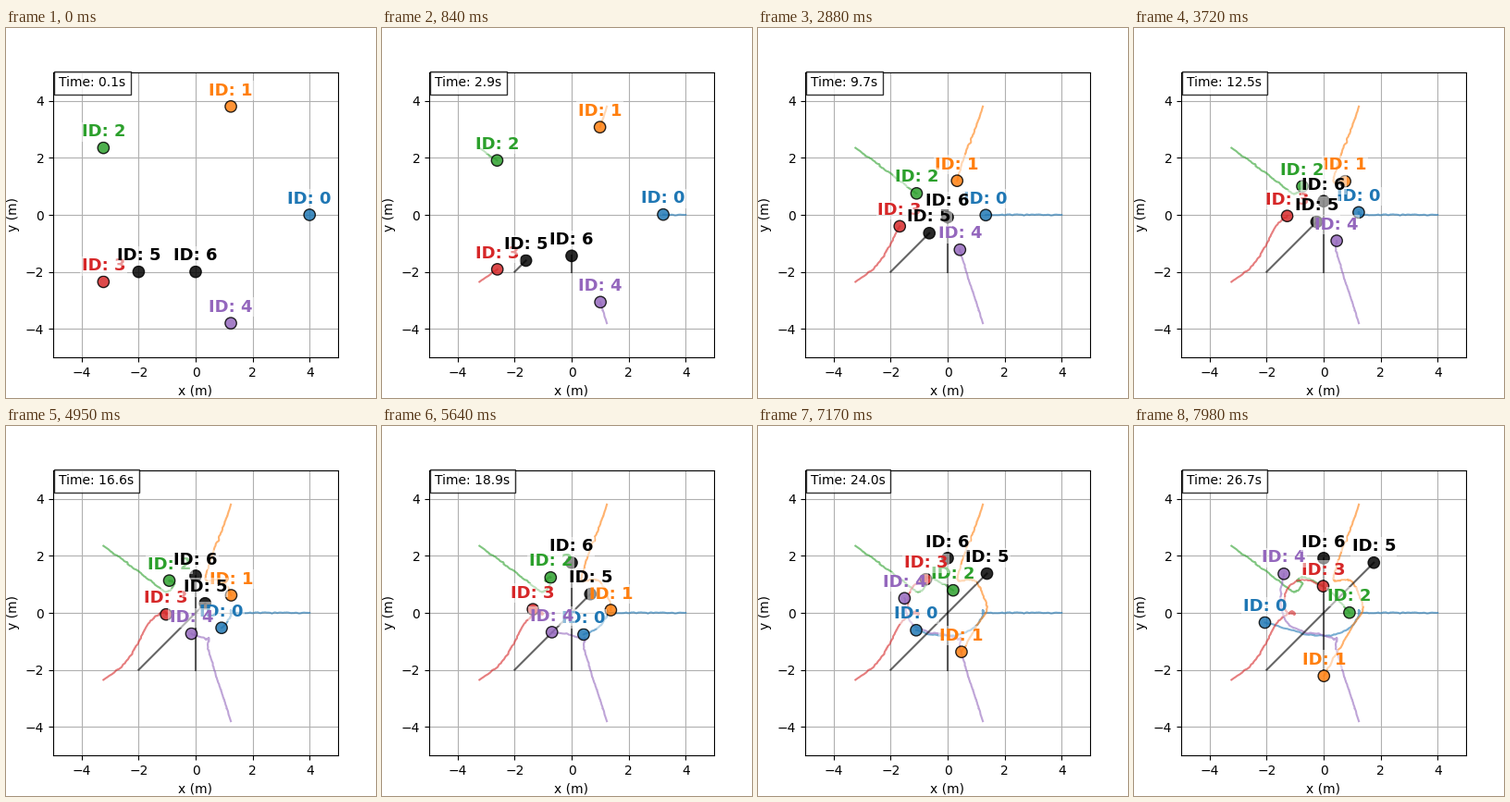
Recreate the animation shown at these times as a matplotlib script. Size 400 by 400 pixels, loop 8000 ms.

```python
import numpy as np
import matplotlib.pyplot as plt
from matplotlib.animation import FuncAnimation
from matplotlib.patches import Circle

STEPS = 267
LOOP_MS = 8000
DT = 0.1

COLORS = ["tab:blue", "tab:orange", "tab:green", "tab:red", "tab:purple",
          "black", "black"]

# Steps at which the swarm robots pass their waypoints (x, y)
KNOTS = np.array([0, 28, 70, 100, 124, 145, 165, 188, 211, 238, 266], dtype=float)
BLUE = [(1.948, 0), (1.3, 0), (1.22, .08), (1.2, -.17), (.91, -.53),
        (.43, -.74), (-.23, -.8), (-1.08, -.62), (-2.05, -.34)]
ORANGE = [(.52, 1.85), (.36, 1.14), (.73, 1.17), (1.0, 1.08), (1.25, .62),
          (1.38, .1), (.96, -.57), (.5, -1.35), (0, -2.21)]
GREEN = [(-1.59, 1.14), (-1.02, .73), (-.747, 1), (-.84, 1.12), (-.925, 1.12),
         (-.74, 1.26), (-.42, 1.14), (.17, .8), (.9, .01)]
RED = [(-2, -1.016), (-1.62, -.33), (-1.266, -.04), (-1.1, .06), (-1.03, -.05),
       (-1.36, .13), (-1.315, .763), (-.78, 1.17), (0, .942)]
PURPLE = [(.594, -1.81), (.43, -1.15), (.47, -.91), (.36, -.92), (-.13, -.747),
          (-.65, -.68), (-1.266, -.357), (-1.52, .48), (-1.396, 1.364)]


def spline(t, vals):
    """Cubic Hermite curve through the uneven knots."""
    slope = np.gradient(vals, KNOTS)
    i = np.clip(np.searchsorted(KNOTS, t, side="right") - 1, 0, len(KNOTS) - 2)
    h = KNOTS[i + 1] - KNOTS[i]
    u = (t - KNOTS[i]) / h
    return ((1 + 2 * u) * (1 - u) ** 2 * vals[i] + u * (1 - u) ** 2 * h * slope[i]
            + u * u * (3 - 2 * u) * vals[i + 1] + u * u * (u - 1) * h * slope[i + 1])


def swarm_path(k, route, rng):
    angle = 2 * np.pi * k / 5
    ray = np.array([np.cos(angle), np.sin(angle)])
    points = np.vstack([4 * ray, 3.23 * ray, route])
    t = np.arange(STEPS)
    path = np.column_stack([spline(t, points[:, axis]) for axis in range(2)])
    wobble = rng.normal(0, 0.022, (STEPS, 2))
    for axis in range(2):
        wobble[:, axis] = np.convolve(wobble[:, axis], np.ones(4) / 4, "same")
    return path + wobble * np.clip(t / 20, 0, 1)[:, None]


def all_paths():
    rng = np.random.default_rng(4)
    routes = [BLUE, ORANGE, GREEN, RED, PURPLE]
    paths = [swarm_path(k, route, rng) for k, route in enumerate(routes)]
    t = np.arange(STEPS)
    diagonal = -2 + 0.02 / np.sqrt(2) * t
    upward = np.minimum(-2 + 0.02 * t, 1.92)
    paths.append(np.column_stack([diagonal, diagonal]))
    paths.append(np.column_stack([np.zeros(STEPS), upward]))
    return paths


paths = all_paths()

fig, ax = plt.subplots(figsize=(4, 4), dpi=100)
ax.set_xlim(-5, 5)
ax.set_ylim(-5, 5)
ax.set_aspect("equal")
ax.set_xticks(range(-4, 5, 2))
ax.set_yticks(range(-4, 5, 2))
ax.set_xlabel("x (m)")
ax.set_ylabel("y (m)")
ax.grid(True)

trails, bodies, labels = [], [], []
for k, color in enumerate(COLORS):
    trails.append(ax.plot([], [], color=color, alpha=0.6, lw=1.5)[0])
    bodies.append(ax.add_patch(Circle((0, 0), 0.2, facecolor=color, edgecolor="black",
                                      alpha=0.84, zorder=2.5)))
    labels.append(ax.text(0, 0, f"ID: {k}", color=color, fontsize=13,
                          fontweight="bold", ha="center",
                          bbox=dict(facecolor="white", edgecolor="none",
                                    alpha=0.5, pad=1)))
clock = ax.text(0.02, 0.95, "", transform=ax.transAxes,
                bbox=dict(facecolor="white", alpha=0.8))


def update(step):
    for path, trail, body, label in zip(paths, trails, bodies, labels):
        x, y = path[step]
        trail.set_data(path[:step + 1, 0], path[:step + 1, 1])
        body.center = (x, y)
        label.set_position((x, y + 0.4))
    clock.set_text(f"Time: {(step + 1) * DT:.1f}s")
    return [*trails, *bodies, *labels, clock]


def reset():
    return update(0)


anim = FuncAnimation(fig, update, frames=STEPS, init_func=reset,
                     interval=LOOP_MS / STEPS, repeat=True, repeat_delay=0)
plt.show()
```
